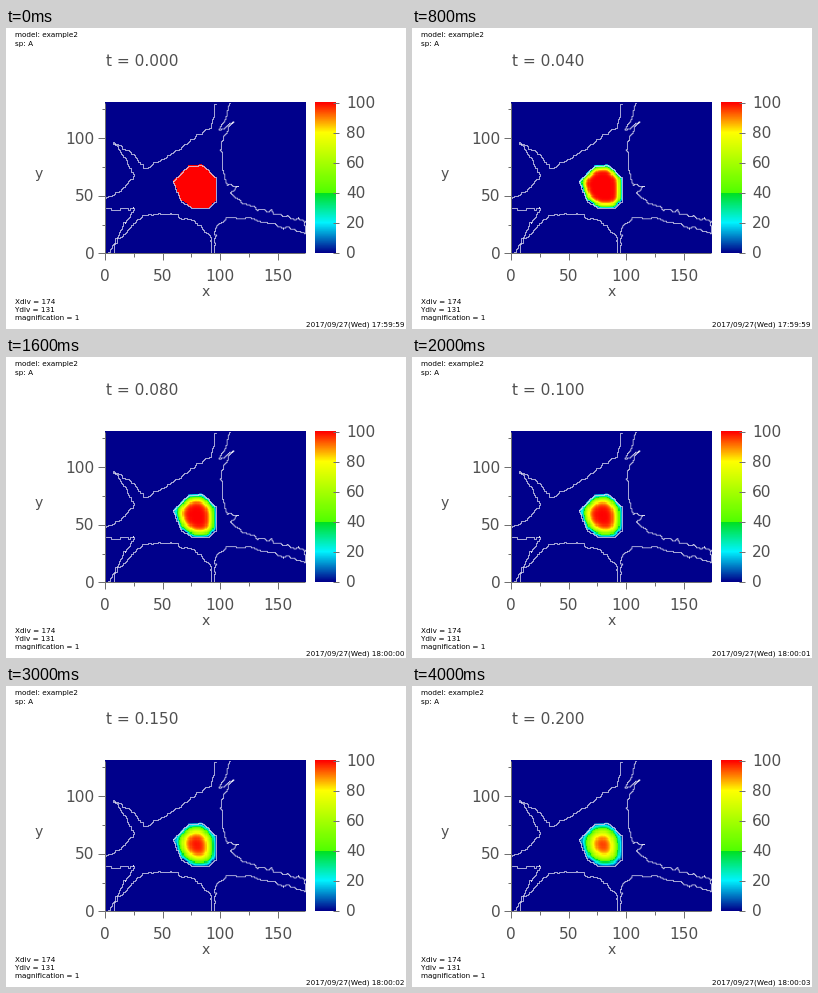
These frames come from a looping animation (400x301 px, 4.1 s). A matplotlib script:

```python
import numpy as np
import matplotlib.pyplot as plt
from matplotlib.animation import FuncAnimation
from matplotlib.colors import LinearSegmentedColormap
from matplotlib.path import Path

W, H, DPI = 400, 301, 64
PX = 72 / DPI                      # points per pixel
FRAMES, INTERVAL = 41, 100
NX, NY, CELL = 174, 131, 1.152     # grid and pixels per cell
LEFT, TOP = 99.0, 74.5
RIGHT, BOTTOM = LEFT + NX * CELL, TOP + NY * CELL
BAR_LEFT, BAR_RIGHT = 309, 330
INK, AXIS, MEMBRANE = "#505050", "#707070", "#dcdcf0"

fig = plt.figure(figsize=(W / DPI, H / DPI), dpi=DPI, facecolor="white")
ax = fig.add_axes([0, 0, 1, 1])
ax.axis("off")

cmap = LinearSegmentedColormap.from_list("field", [
    (0, "#00008b"), (0.2, "#00f4ff"), (0.4, "#00e01c"),
    (0.4, "#50ff00"), (0.8, "#ffff00"), (1, "#ff0000")], N=512)


def write(text, x, base, ha="left", size=15.4, color=INK):
    return ax.text(x, base, text, family="DejaVu Sans", size=size * PX,
                   color=color, ha=ha, va="baseline")


def note(text, x, base, ha="left"):
    return write(text, x, base, ha, size=7.3, color="black")


def line(x0, y0, x1, y1):
    ax.plot([x0, x1], [y0, y1], color=AXIS, lw=PX, solid_capstyle="butt")


# --- outlines that follow the grid cells ---

rng = np.random.default_rng(4)


def stairs(points, wobble=0.0):
    """Polyline through the points, roughened and snapped to cell edges."""
    p = (np.array(points, float) - (LEFT, TOP)) / CELL
    d = np.r_[0, np.cumsum(np.hypot(*np.diff(p, axis=0).T))]
    s = np.arange(0, d[-1] + 0.5, 0.5)
    knots = np.arange(0, d[-1] + 3, 3)
    cells = np.column_stack([
        np.interp(s, d, p[:, k])
        + np.interp(s, knots, wobble * rng.normal(size=len(knots)))
        for k in (0, 1)])
    steps = np.repeat(np.round(cells), 2, axis=0)[1:]
    steps[1::2, 1] = steps[:-1:2, 1]
    return steps * CELL + (LEFT, TOP)


membranes = [
    [(99, 170), (115, 163), (128, 147), (119, 131), (107, 113), (127, 126),
     (138, 140), (158, 130), (183, 113), (203, 100), (209, 86), (209, 75)],
    [(224, 75), (214, 103), (228, 93), (216, 112), (216, 140), (221, 157),
     (231, 158), (225, 166), (237, 176), (262, 184), (299, 194), (299, 206),
     (265, 196), (240, 190), (222, 190), (210, 199), (209, 226)],
    [(206, 226), (205, 209), (188, 192), (160, 185), (136, 188),
     (122, 203), (110, 214), (107, 226)],
    [(99, 181), (128, 181), (121, 190), (114, 204), (102, 226)],
]
nucleus = [(167, 153), (182, 138), (196, 137), (210, 150), (210, 173),
           (203, 180), (186, 180), (174, 172), (167, 153)]
spot = stairs(nucleus)


# --- diffusion out of the nucleus, zero outside ---

gx, gy = np.meshgrid(LEFT + (np.arange(NX) + 0.5) * CELL,
                     TOP + (np.arange(NY) + 0.5) * CELL)
inside = Path(spot).contains_points(
    np.column_stack([gx.ravel(), gy.ravel()])).reshape(NY, NX)


def diffuse(rate=0.15, substeps=4):
    c = 100.0 * inside
    fields = [c]
    for _ in range(FRAMES - 1):
        for _ in range(substeps):
            lap = sum(np.roll(c, s, axis=a) for s in (1, -1) for a in (0, 1))
            c = (c + rate * (lap - 4 * c)) * inside
        fields.append(c)
    return fields


def show(data, left, right):
    return ax.imshow(data, cmap=cmap, vmin=0, vmax=100, aspect="auto",
                     extent=(left, right, BOTTOM, TOP),
                     interpolation="nearest")


fields = diffuse()

# --- plot area ---

image = show(fields[0], LEFT, RIGHT)
for xy in [stairs(m, 0.7) for m in membranes] + [spot]:
    ax.plot(np.clip(xy[:, 0], LEFT, RIGHT), np.clip(xy[:, 1], TOP, BOTTOM),
            color=MEMBRANE, lw=0.75 * PX)

line(LEFT, TOP, LEFT, BOTTOM)
line(LEFT, BOTTOM, RIGHT, BOTTOM)
for v in range(0, NX, 25):
    major = v % 50 == 0
    size = 7 if major else 3.5
    x, y = LEFT + v * CELL, BOTTOM - v * CELL
    line(x, BOTTOM, x, BOTTOM + size)
    if major:
        write(str(v), x, 253, "center")
    if v < NY:
        line(LEFT - size, y, LEFT, y)
        if major:
            write(str(v), 88.5, y + 5.5, "right")
write("x", 199.5, 268, "center", 14)
write("y", 33, 150, "center", 14)

# --- colour bar ---

show(np.linspace(100, 0, 300)[:, None], BAR_LEFT, BAR_RIGHT)
for v in range(0, 101, 20):
    y = BOTTOM - (BOTTOM - TOP) * v / 100
    line(BAR_RIGHT - 3, y, BAR_RIGHT + 3, y)
    write(str(v), 340, y + 5)

for i, text in enumerate(["model: example2", "sp: A"]):
    note(text, 9, 9.5 + 8.5 * i)
for i, text in enumerate([f"Xdiv = {NX}", f"Ydiv = {NY}",
                          "magnification = 1"]):
    note(text, 9, 276 + 8 * i)
clock = note("", 398.5, 298, "right")
timer = write("", 100, 38.5)

ax.set_xlim(0, W)
ax.set_ylim(H, 0)


def update(n):
    image.set_data(fields[n])
    timer.set_text(f"t = {n * 0.005:.3f}")
    sec = 17 * 3600 + 59 * 60 + 59 + (n + 1) // 10
    clock.set_text(f"2017/09/27(Wed) {sec // 3600}:"
                   f"{sec // 60 % 60:02d}:{sec % 60:02d}")
    return image, timer, clock


anim = FuncAnimation(fig, update, frames=FRAMES, interval=INTERVAL,
                     repeat=True, repeat_delay=0, blit=False)
plt.show()
```
